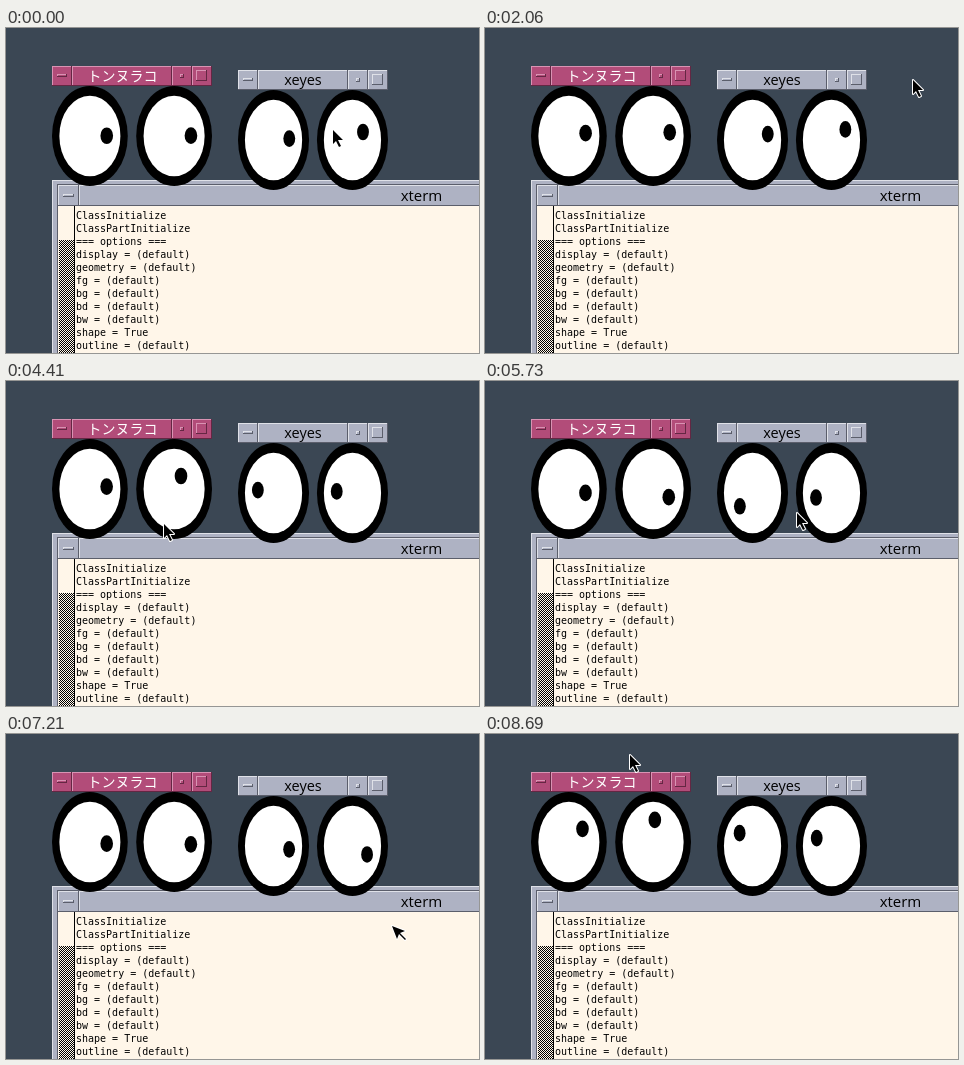
These frames come from a looping animation (473 px wide and 325 px high, 8.75 s). An HTML page with a canvas:

```html
<!DOCTYPE html>
<html lang="en">
<head>
<meta charset="utf-8">
<title>xeyes</title>
<style>
html, body { margin: 0; width: 100%; height: 100%; overflow: hidden; background: #3b4754; }
canvas { display: block; }
</style>
</head>
<body>
<canvas id="stage" width="473" height="325"></canvas>
<script>
const ctx = document.getElementById('stage').getContext('2d');
const LOOP = 8750, STEPS = 120;
const PINK = ['#b24c79', '#d993b3', '#642743'];
const GREY = ['#aeb2c3', '#dfe1e8', '#5b5e6b'];
const CREAM = '#fff6e9';
const OPTIONS = ['display', 'geometry', 'fg', 'bg', 'bd', 'bw', 'shape', 'outline'];
const LINES = ['ClassInitialize', 'ClassPartInitialize', '=== options ===',
  ...OPTIONS.map(name => `${name} = ${name === 'shape' ? 'True' : '(default)'}`)];

// Turning points of the pointer: step, x, y
const PATH = [
  [-1, 357, 104], [0, 326, 101], [13, 32, 106], [16, 22, 108], [19, 50, 205], [22, 170, 252],
  [25, 370, 170], [27, 428, 50], [28, 427, 51], [33, 160, 28], [36, 28, 150], [38, 100, 228],
  [41, 250, 27], [44, 285, 162], [46, 241, 208], [50, 160, 110], [55, 270, 190], [59, 175, 95],
  [60, 157, 142], [63, 190, 190], [67, 250, 75], [72, 45, 110], [75, 68, 200], [78, 311, 131],
  [82, 400, 285], [87, 45, 170], [91, 110, 30], [95, 350, 38], [98, 386, 192], [101, 250, 285],
  [105, 110, 190], [110, 455, 180], [115, 270, 30], [119, 144, 20]
];

// Smooth curve through the turning points
function pointerAt(step) {
  const last = PATH.length - 1;
  let i = 0;
  while (i < last - 1 && PATH[i + 1][0] <= step) i++;
  const a = PATH[i], b = PATH[i + 1], d = b[0] - a[0], u = (step - a[0]) / d;
  const slope = (k, axis) => {
    const p = PATH[Math.max(k - 1, 0)], q = PATH[Math.min(k + 1, last)];
    return (q[axis] - p[axis]) / (q[0] - p[0]);
  };
  return [1, 2].map(axis => Math.round(
    (1 + 2 * u) * (1 - u) ** 2 * a[axis] + u * u * (3 - 2 * u) * b[axis]
    + d * u * (1 - u) * ((1 - u) * slope(i, axis) - u * slope(i + 1, axis))));
}

function rect(x, y, w, h, color) {
  ctx.fillStyle = color;
  ctx.fillRect(x, y, w, h);
}

function bevel(x, y, w, h, [base, light, dark]) {
  rect(x, y, w, h, dark);
  rect(x, y, w - 1, h - 1, light);
  rect(x + 1, y + 1, w - 2, h - 2, base);
}

// Raised button with a centred raised icon
function button(x, y, size, iconW, iconH, colors) {
  bevel(x, y, size, size, colors);
  bevel(x + Math.floor((size - iconW) / 2), y + Math.floor((size - iconH) / 2), iconW, iconH, colors);
}

function text(str, x, y, font, color, align = 'center') {
  ctx.font = font;
  ctx.fillStyle = color;
  ctx.textAlign = align;
  ctx.fillText(str, x, y);
}

function oval(x, y, rx, ry, color) {
  ctx.fillStyle = color;
  ctx.beginPath();
  ctx.ellipse(x, y, rx, ry, 0, 0, 2 * Math.PI);
  ctx.fill();
}

function titleBar(x, y, w, colors) {
  button(x, y, 20, 10, 3, colors);
  bevel(x + 20, y, w - 60, 20, colors);
  button(x + w - 40, y, 20, 4, 4, colors);
  button(x + w - 20, y, 20, 11, 11, colors);
}

// A pair of eyes filling a 3.8 by 1.8 unit window
function eyes(x, y, w, h, [mx, my]) {
  const sx = w / 3.8, sy = h / 1.8, cy = y + h / 2;
  for (const cx of [x + 0.9 * sx, x + 2.9 * sx]) {
    const dx = mx - cx, dy = my - cy;
    const reach = Math.max(1, Math.hypot(dx / sx, dy / sy) / 0.4);
    oval(cx, cy, 0.9 * sx, 0.9 * sy, '#000');
    oval(cx, cy, 0.725 * sx, 0.725 * sy, '#fff');
    oval(cx + dx / reach, cy + dy / reach, 0.15 * sx, 0.15 * sy, '#000');
  }
}

function xterm() {
  bevel(46, 152, 500, 300, GREY);
  rect(51, 156, 450, 1, GREY[2]);
  rect(51, 156, 1, 200, GREY[2]);
  button(52, 157, 21, 11, 3, GREY);
  bevel(73, 157, 450, 21, GREY);
  text('xterm', 415.5, 173, '15px "Open Sans", sans-serif', '#000');
  rect(52, 178, 430, 150, CREAM);
  rect(68, 178, 1, 150, '#000');
  rect(53, 212, 15, 120, stipple);
  LINES.forEach((line, i) =>
    text(line, 70, 191 + 13 * i, '10px "DejaVu Sans Mono", monospace', '#000', 'left'));
}

function arrow(x, y, points) {
  ctx.beginPath();
  points.forEach(([px, py]) => ctx.lineTo(x + px, y + py));
  ctx.closePath();
  ctx.strokeStyle = '#fff';
  ctx.lineWidth = 2;
  ctx.lineJoin = 'round';
  ctx.stroke();
  ctx.fillStyle = '#000';
  ctx.fill();
}

function pointer([x, y]) {
  if (x > 68 && y > 177) {
    arrow(x, y, [[0, 0], [13, 5], [8, 7], [14, 13], [13, 14], [7, 8], [5, 13]]);
  } else {
    arrow(x + 1, y + 1, [[0, 0], [0, 14], [3, 11], [6, 17], [8, 16], [5, 10], [10, 10]]);
  }
}

function makeStipple() {
  const tile = document.createElement('canvas');
  tile.width = tile.height = 2;
  const t = tile.getContext('2d');
  t.fillStyle = CREAM;
  t.fillRect(0, 0, 2, 2);
  t.fillStyle = '#000';
  t.fillRect(1, 0, 1, 1);
  t.fillRect(0, 1, 1, 1);
  return ctx.createPattern(tile, 'repeat');
}
const stipple = makeStipple();

function draw(now) {
  const step = Math.floor((now % LOOP) / LOOP * STEPS);
  const seen = pointerAt(step - 1); // the eyes trail the pointer by one step

  rect(0, 0, 473, 325, '#3b4754');
  xterm();
  titleBar(46, 38, 160, PINK);
  text('トンヌラコ', 116.5, 53, '14px "Noto Sans CJK JP", "Noto Sans CJK", sans-serif', '#fff');
  titleBar(232, 42, 150, GREY);
  text('xeyes', 297, 57, '14.5px "Open Sans", sans-serif', '#000');
  eyes(46, 58, 160, 100, seen);
  eyes(232, 62, 150, 100, seen);
  pointer(pointerAt(step));
}

const start = performance.now();
function frame() {
  draw(performance.now() - start);
  requestAnimationFrame(frame);
}
frame();
</script>
</body>
</html>
```
